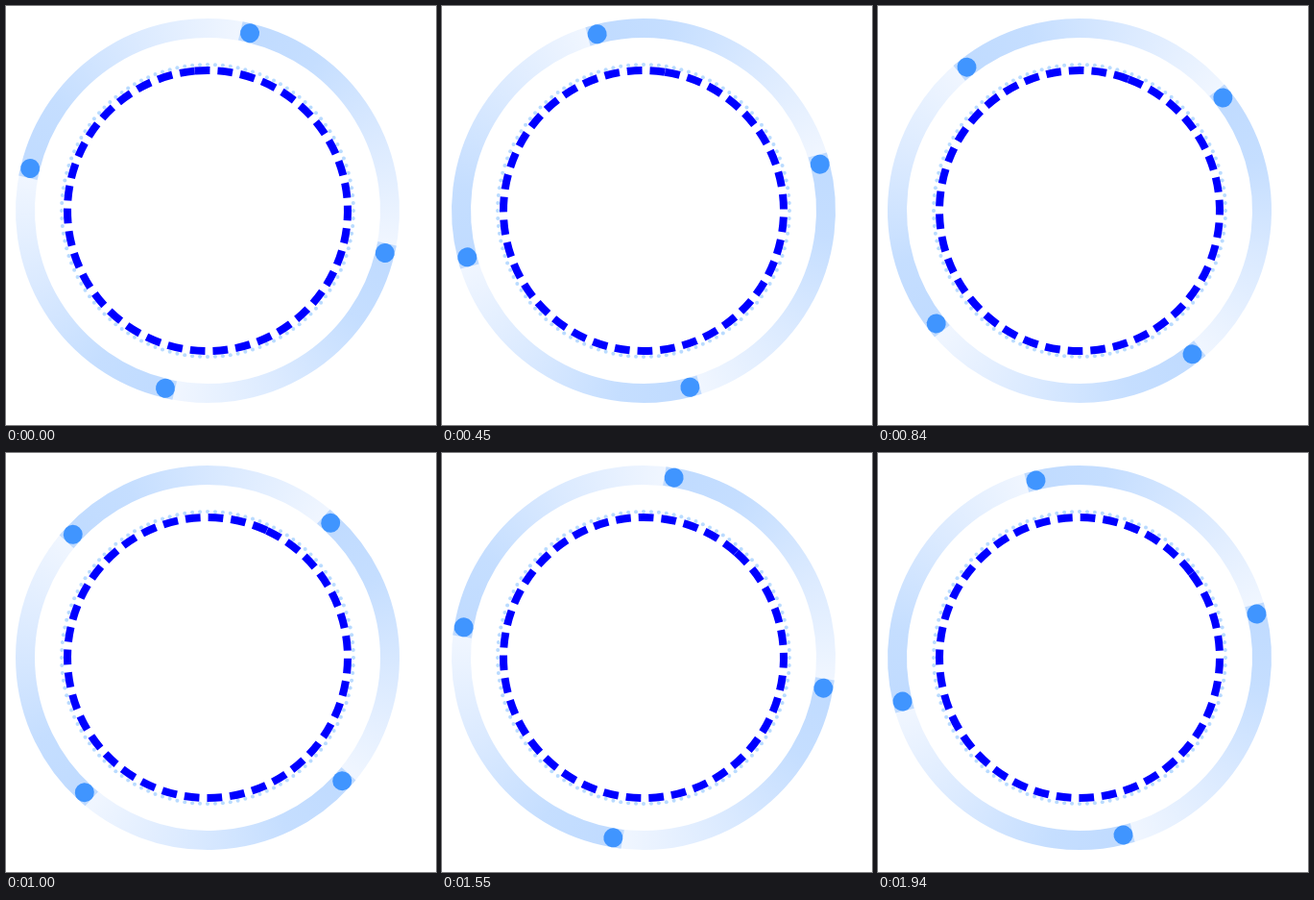
Recreate the animation shown at these times as an HTML page with a canvas. Size 448 by 436 pixels, loop 2.03 s.

```html
<!DOCTYPE html>
<html lang="en">
<head>
<meta charset="utf-8">
<title>Rotating rings</title>
<style>
  html, body { margin: 0; width: 100%; height: 100%; overflow: hidden; background: #fff; }
  canvas { display: block; }
</style>
</head>
<body>
<canvas id="stage" width="448" height="436"></canvas>
<script>
const ctx = document.getElementById("stage").getContext("2d");
const LOOP = 2030;
const TAU = Math.PI * 2;
const rad = deg => deg * Math.PI / 180;

// Moments at which the rings tick forward
const ticks = [
  0, 70, 140, 220, 300, 380, 450, 520, 590,
  680, 750, 840, 910, 1000, 1070, 1160,
  1230, 1320, 1390, 1480, 1550, 1640, 1710,
  1800, 1870, 1940
];

const DARK = "#c0dbff";
const fade = ctx.createConicGradient(0, 0, 0);
[[0, DARK], [0.25, "#c5deff"], [0.6, "#dbeaff"], [1, "#f2f7ff"]]
  .forEach(([at, color]) => fade.addColorStop(at / 4, color));

function arc(radius, from, to, width, color) {
  ctx.beginPath();
  ctx.arc(0, 0, radius, rad(from), rad(to));
  ctx.lineWidth = width;
  ctx.strokeStyle = color;
  ctx.stroke();
}

function disc(x, y, r, color) {
  ctx.beginPath();
  ctx.arc(x, y, r, 0, TAU);
  ctx.fillStyle = color;
  ctx.fill();
}

// Runs a drawing in a frame turned clockwise, with 0 degrees at the top
function turned(deg, paint) {
  ctx.save();
  ctx.rotate(rad(deg - 90));
  paint();
  ctx.restore();
}

function outerRing(angle) {
  const quarters = paint => {
    for (let i = 0; i < 4; i++) turned(angle + i * 90, paint);
  };
  quarters(() => arc(190, 0, 90, 20, fade));
  quarters(() => {
    ctx.fillStyle = DARK;
    ctx.fillRect(180, -10, 20, 10.5);
    disc(190, 0, 10, "#4095ff");
  });
}

function dottedRing() {
  const count = 120;
  for (let i = 0; i < count; i++) {
    const a = i / count * TAU;
    disc(152 * Math.cos(a), 152 * Math.sin(a), 2, "#b9dbff");
  }
}

function dashedRing(angle) {
  const period = 9.31, dash = 6.16;
  turned(angle, () => {
    for (let i = 0; i < 39; i++) arc(146, i * period, i * period + dash, 8, "#0000ff");
  });
}

function draw(time) {
  const step = ticks.filter(t => t <= time).length - 1;
  ctx.setTransform(1, 0, 0, 1, 0, 0);
  ctx.fillStyle = "#fff";
  ctx.fillRect(0, 0, 448, 436);
  ctx.translate(210, 213);
  outerRing(13.4 - 4.69 * step);
  dottedRing();
  dashedRing(-5.2 + 2.33 * step);
}

const start = performance.now();
function frame() {
  draw((performance.now() - start) % LOOP);
  requestAnimationFrame(frame);
}
frame();
</script>
</body>
</html>
```
